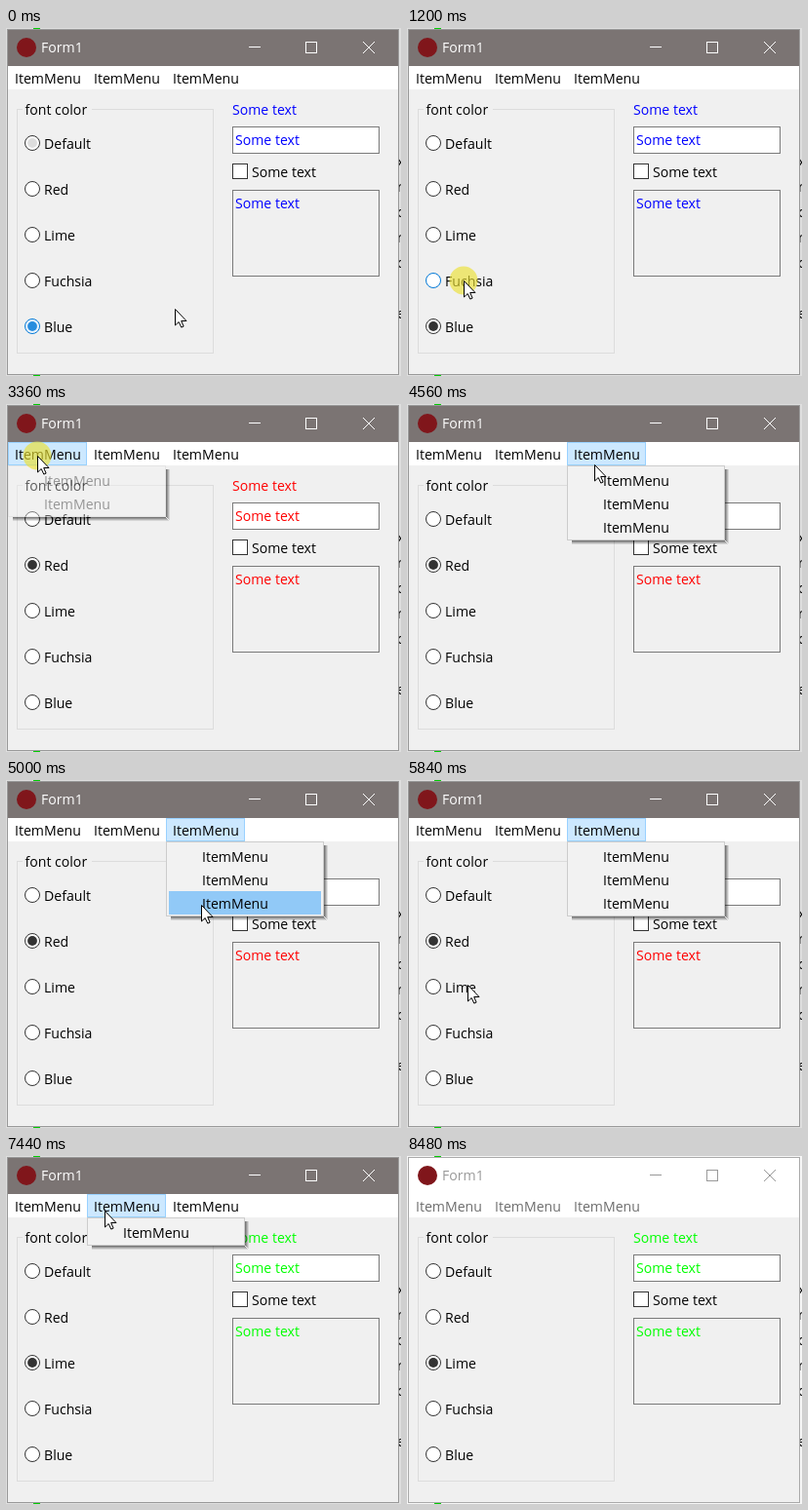
Animation of 405 by 357 pixels, one loop 8520 ms. Source, as an HTML page with a canvas:

```html
<!DOCTYPE html>
<html lang="en">
<head>
<meta charset="utf-8">
<title>Form1</title>
<style>
  html, body { margin: 0; width: 100%; height: 100%; overflow: hidden; background: #fff; }
  canvas { display: block; }
</style>
</head>
<body>
<canvas width="405" height="357"></canvas>
<script>
const ctx = document.querySelector('canvas').getContext('2d');
const LOOP = 8520, STEP = 80, FADE = 240, BLUR_AT = 8480;
const FONT = '14.1px "Open Sans", "Noto Sans", sans-serif';
const BLUE = '#0078d7', DARK = '#333';

const options = [
  ['Default', '#000'], ['Red', '#f00'], ['Lime', '#0f0'], ['Fuchsia', '#f0f'], ['Blue', '#00f']
];
const itemCounts = [2, 1, 3];
const radioY = i => 118 + 47 * i;
const barX = i => 2 + 81 * i;

// Cursor moves: start, end, x, y
const moves = [
  [560, 1000, 58, radioY(3)],
  [1520, 1920, 51, radioY(2)],
  [2160, 2480, 48, radioY(1)],
  [2720, 3200, 32, 53],
  [3520, 3720, 108, 53],
  [3840, 4280, 191, 53],
  [4450, 4960, 200, 128],
  [5040, 5760, 62, 210],
  [6400, 6880, 36, 54],
  [7280, 7440, 101, 56],
  [7440, 8000, 130, 358]
];
const presses = [1200, 2000, 2560, 3360, 5920, 6960];

const clamp = v => Math.max(0, Math.min(1, v));
const smooth = k => k * k * (3 - 2 * k);

function cursorAt(t) {
  let x = 173, y = 288;
  for (const [from, to, tx, ty] of moves) {
    const k = smooth(clamp((t - from) / (to - from)));
    x += (tx - x) * k;
    y += (ty - y) * k;
  }
  return [Math.round(x), Math.round(y)];
}

function barAt([x, y]) {
  return y >= 39 && y < 63 ? Math.floor((x - barX(0)) / 81) : -1;
}

function radioAt([x, y]) {
  const i = Math.round((y - radioY(0)) / 47);
  return x > 17 && x < 205 && options[i] ? i : -1;
}

// A radio changes when the button is released; two picks precede the loop.
const picks = [{ at: -600, option: 0 }, { at: -200, option: 4 }];
for (const p of presses) {
  const option = radioAt(cursorAt(p));
  if (option >= 0) picks.push({ at: p + STEP, option });
}

// A press on the bar opens a menu; it then follows the cursor along the bar.
function menuAt(t) {
  const since = presses.filter(p => p <= t).pop();
  if (t >= BLUR_AT || since === undefined) return null;
  const first = barAt(cursorAt(since));
  if (first < 0) return null;
  let index = first;
  for (let u = since; u <= t; u += STEP) {
    const over = barAt(cursorAt(u));
    if (over >= 0) index = over;
  }
  return { index, alpha: index === first ? clamp(.38 + (t - since) / FADE) : 1 };
}

function fill(x, y, w, h, color) {
  ctx.fillStyle = color;
  ctx.fillRect(x, y, w, h);
}

function frame(x, y, w, h, color) {
  ctx.strokeStyle = color;
  ctx.strokeRect(x + .5, y + .5, w - 1, h - 1);
}

function box(x, y, w, h, bg, edge) {
  fill(x, y, w, h, bg);
  frame(x, y, w, h, edge);
}

function text(s, x, y, color = '#000') {
  ctx.fillStyle = color;
  ctx.fillText(s, x, y);
}

function disc(x, y, r, color) {
  ctx.fillStyle = color;
  ctx.beginPath();
  ctx.arc(x, y, r, 0, 7);
  ctx.fill();
}

function line(color, x1, y1, x2, y2) {
  ctx.strokeStyle = color;
  ctx.beginPath();
  ctx.moveTo(x1, y1);
  ctx.lineTo(x2, y2);
  ctx.stroke();
}

function drawBackdrop(active) {
  fill(0, 0, 405, 357, active ? '#dedede' : '#f6f6f6');
  fill(28, 0, 7, 357, '#0c0');
  [...'xrcrc e'].forEach((c, i) => text(c, 401, 142 + 26 * i));
}

function drawWindow(active) {
  box(1, 1, 402, 355, '#f0f0f0', active ? '#999' : '#aaa');
  fill(2, 2, 400, 37, active ? '#7b7473' : '#fff');
  fill(2, 39, 400, 24, '#fff');
  disc(21, 20, 10, '#80161b');
  const ink = active ? '#fff' : '#999';
  text('Form1', 36, 25, ink);
  line(ink, 249, 19.5, 261, 19.5);
  frame(307, 14, 12, 12, ink);
  line(ink, 366, 14, 378, 26);
  line(ink, 378, 14, 366, 26);
}

function drawMenuBar(lit, active) {
  for (let i = 0; i < 3; i++) {
    const x = barX(i);
    if (i === lit) box(x, 39, 81, 24, '#cce8ff', '#99d1ff');
    text('ItemMenu', x + 7, 57, active ? '#000' : '#6d6d6d');
  }
}

function drawRadio(i, t, hot) {
  const x = 27, y = radioY(i);
  const [previous, current] = picks.filter(p => p.at <= t).slice(-2);
  const chosen = current.option === i;
  const fade = clamp((t - current.at) / FADE);
  const color = hot ? BLUE : DARK;
  disc(x, y, 7.5, chosen && fade < 1 ? '#eef6fd' : '#fff');
  ctx.strokeStyle = color;
  ctx.stroke();
  ctx.globalAlpha = chosen ? fade : previous.option === i ? 1 - fade : 0;
  disc(x, y, 4.9, color);
  ctx.globalAlpha = 1;
  text(options[i][0], 39, y + 6);
}

function drawControls(t, hot) {
  frame(11, 83, 202, 251, '#dcdcdc');
  fill(17, 80, 71, 8, '#f0f0f0');
  text('font color', 19.5, 89);
  options.forEach((_, i) => drawRadio(i, t, i === hot));

  const color = options[picks.filter(p => p.at <= t).pop().option][1];
  text('Some text', 232, 89, color);
  box(232, 101, 151, 28, '#fff', '#7a7a7a');
  text('Some text', 235, 120, color);
  box(232, 139, 16, 16, '#fff', DARK);
  text('Some text', 252, 153);
  frame(232, 166, 151, 89, '#7a7a7a');
  text('Some text', 235, 185, color);
}

function drawMenu({ index, alpha }, cx, cy) {
  const count = itemCounts[index];
  const x = barX(index), y = 63, w = 162, h = 5 + 24 * count;
  for (let k = 0; k < 4; k++) {
    const shade = `rgba(0,0,0,${.5 - .13 * k})`;
    fill(x + w + k, y + 4, 1, h - 4 + k, shade);
    fill(x + 5, y + h + k, w - 5 + k, 1, shade);
  }
  ctx.globalAlpha = alpha;
  box(x, y, w, h, '#f2f2f2', '#ccc');
  for (let i = 0; i < count; i++) {
    const top = y + 3 + 24 * i;
    if (cx >= x && cx < x + w && cy >= top && cy < top + 24) fill(x + 3, top, w - 6, 24, '#91c9f7');
    text('ItemMenu', x + 37, top + 18);
  }
  ctx.globalAlpha = 1;
}

function drawCursor(x, y) {
  ctx.save();
  ctx.translate(x + .5, y + .5);
  const arrow = new Path2D('M0 0V16.5L3.7 13L6.3 18.6L8.6 17.6L6.2 12H11.5Z');
  ctx.fillStyle = '#fff';
  ctx.fill(arrow);
  ctx.strokeStyle = '#000';
  ctx.stroke(arrow);
  ctx.restore();
}

function draw(now) {
  const t = Math.floor(now % LOOP / STEP) * STEP;
  const active = t < BLUR_AT;
  const cursor = cursorAt(t), menu = menuAt(t);

  ctx.font = FONT;
  ctx.lineWidth = 1;
  drawBackdrop(active);
  drawWindow(active);
  drawMenuBar(menu ? menu.index : barAt(cursor), active);
  drawControls(t, menu || !active ? -1 : radioAt(cursor));
  if (menu) drawMenu(menu, ...cursor);
  if (presses.includes(t)) disc(...cursor, 14.5, 'rgba(235,225,50,.65)');
  if (active) drawCursor(...cursor);
}

const start = performance.now();
function tick() {
  draw(performance.now() - start);
  requestAnimationFrame(tick);
}
tick();
</script>
</body>
</html>
```
